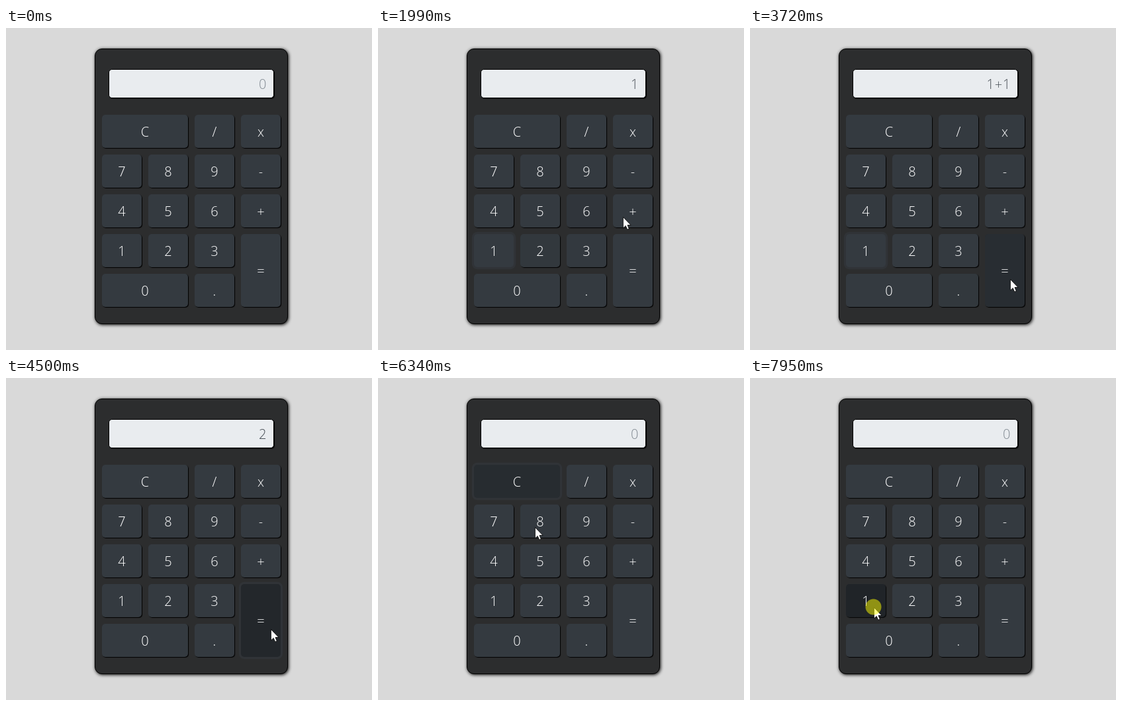
An HTML page for the animation above (8000 ms loop, 553 px wide and 486 px high).

```html
<!DOCTYPE html>
<html lang="en">
<head>
<meta charset="utf-8">
<title>Calculator</title>
<style>
  html, body { margin: 0; width: 100%; height: 100%; overflow: hidden; background: #d9d9d9; }
  div { position: absolute; box-sizing: border-box; }
  #panel {
    left: 134px; top: 31px; width: 292px; height: 416px;
    background: #2c2d2e; border: 1px solid #000; border-radius: 11px;
    box-shadow: 1px 1px 5px #000;
  }
  #display {
    left: 155px; top: 62px; width: 250px; height: 44px;
    background: #e9ecef; border: 1px solid #000; border-radius: 5px;
    box-shadow: 1px 1px 1px #000;
  }
  .key { border-radius: 5px; }
  svg { position: absolute; left: 0; top: 0; }
  text { font: 350 20px "Open Sans", "Noto Sans", sans-serif; text-anchor: middle; fill: #fff; }
</style>
</head>
<body>
<div id="panel"></div>
<div id="display"></div>
<svg width="553" height="486" viewBox="0 0 553 486">
  <g id="labels"></g>
  <text id="value" y="92"></text>
  <g id="cursor">
    <path d="M.4 .4V17L4.2 13.5L6.7 19.2L9.3 18.1L7 12.5H12Z" fill="#fff" stroke="#000" stroke-width=".8"/>
    <circle id="halo" r="12" cx="-.5" cy="-.5" fill="#ff0" fill-opacity=".5"/>
  </g>
</svg>
<script>
const LOOP = 8000, FADE = 150, LAG = 60, HOLD = 150, APPEAR = 210;
const BASE = [52, 58, 64], HOVER = [35, 39, 43], ACTIVE = [29, 33, 36];
const ENTRY = { x: 492, y: 456 };
const $ = id => document.getElementById(id);
const clamp = v => Math.max(0, Math.min(1, v));
const smooth = v => v * v * (3 - 2 * v);
const ramp = (t, from, span) => clamp((t - from) / span);
const mix = (a, b, k) => a.map((v, i) => v + (b[i] - v) * k);

// equal neighbours form one larger key
const grid = ['CC/x', '789-', '456+', '123=', '00.='];
const keys = [...new Set(grid.join(''))].map(label => {
  const row = grid.findIndex(r => r.includes(label)), col = grid[row].indexOf(label);
  const cols = grid[row].lastIndexOf(label) - col + 1;
  const rows = grid.filter(r => r.includes(label)).length;
  const x = 145 + col * 70, y = 131 + row * 60, w = cols * 70 - 10, h = rows * 60 - 10;

  const el = document.createElement('div');
  el.className = 'key';
  el.style.cssText = `left:${x}px;top:${y}px;width:${w}px;height:${h}px`;
  document.body.insertBefore(el, document.querySelector('svg'));

  const text = document.createElementNS('http://www.w3.org/2000/svg', 'text');
  text.setAttribute('x', x + w / 2);
  text.setAttribute('y', y + h / 2 + 8);
  text.textContent = label;
  $('labels').appendChild(text);
  return { label, x, y, w, h, el };
});

const inside = (k, p) => p && p.x >= k.x && p.x < k.x + k.w && p.y >= k.y && p.y < k.y + k.h;

// pointer moves, most of them ending in a press
const moves = [
  { at: 430, span: 670, x: 186, y: 346, press: 1280 },
  { at: 1560, span: 520, x: 386, y: 280, press: 2140 },
  { at: 2380, span: 110, x: 157, y: 347, press: 3000 },
  { at: 3300, span: 340, x: 393, y: 379, press: 3790 },
  { at: 4400, span: 100, x: 400, y: 379 },
  { at: 4960, span: 550, x: 230, y: 168, press: 5600 },
  { at: 6175, span: 440, x: 187, y: 346, press: 7880, bend: 25 }
];

const clicks = moves.filter(m => m.press)
  .map(m => ({ down: m.press, up: m.press + HOLD, key: keys.find(k => inside(k, m)) }));

function pointer(t) {
  if (t < APPEAR) return null;
  return moves.reduce((p, m) => {
    const e = smooth(ramp(t, m.at, m.span));
    return {
      x: p.x + (m.x - p.x) * e + (m.bend || 0) * Math.sin(Math.PI * e),
      y: p.y + (m.y - p.y) * e
    };
  }, ENTRY);
}

function enter(value, { key: { label } }) {
  if (label === 'C') return '';
  if (label === '=') return String(value.split('+').reduce((sum, n) => sum + Number(n), 0));
  return value + label;
}

function showValue(value) {
  let right = 393;
  const text = value || '0';
  const xs = [...text].reverse().map(c => {
    const w = c === '+' ? 13.7 : 10.8;
    right -= w;
    return right + w / 2;
  }).reverse();
  $('value').setAttribute('x', xs.join(' '));
  $('value').textContent = text;
  $('value').style.fill = value ? '#495057' : '#868e96';
}

function drawKey(k, t, trail) {
  const hover = trail.filter(p => inside(k, p)).length / trail.length;
  let active = 0, focus = 0;
  clicks.forEach((c, i) => {
    if (c.key !== k) return;
    const next = clicks[i + 1] ? clicks[i + 1].down : LOOP;
    active = Math.max(active, ramp(t, c.down, FADE) * (1 - ramp(t, c.up, FADE)));
    focus = Math.max(focus, ramp(t, c.down + LAG, FADE) * (1 - ramp(t, next, FADE / 2)));
  });
  const edge = 1 - focus;
  k.el.style.background = `rgb(${mix(mix(BASE, HOVER, hover), ACTIVE, active).map(Math.round)})`;
  k.el.style.boxShadow =
    `${edge}px ${edge}px 1px rgba(0,0,0,${edge}), 0 0 0 ${3.2 * focus}px rgba(52,58,64,.5)`;
}

function draw(t) {
  // recent pointer positions give each key its fading hover level
  const trail = Array.from({ length: 16 }, (_, i) => pointer(t - LAG - i * FADE / 15));
  keys.forEach(k => drawKey(k, t, trail));
  showValue(clicks.filter(c => t >= c.up).reduce(enter, ''));

  const p = pointer(t);
  $('cursor').style.display = p ? '' : 'none';
  if (p) $('cursor').setAttribute('transform', `translate(${Math.round(p.x)} ${Math.round(p.y)})`);
  $('halo').style.display = clicks.some(c => t >= c.down && t < c.up) ? '' : 'none';
}

const start = performance.now();
function tick() {
  draw((performance.now() - start) % LOOP);
  requestAnimationFrame(tick);
}
tick();
</script>
</body>
</html>
```
